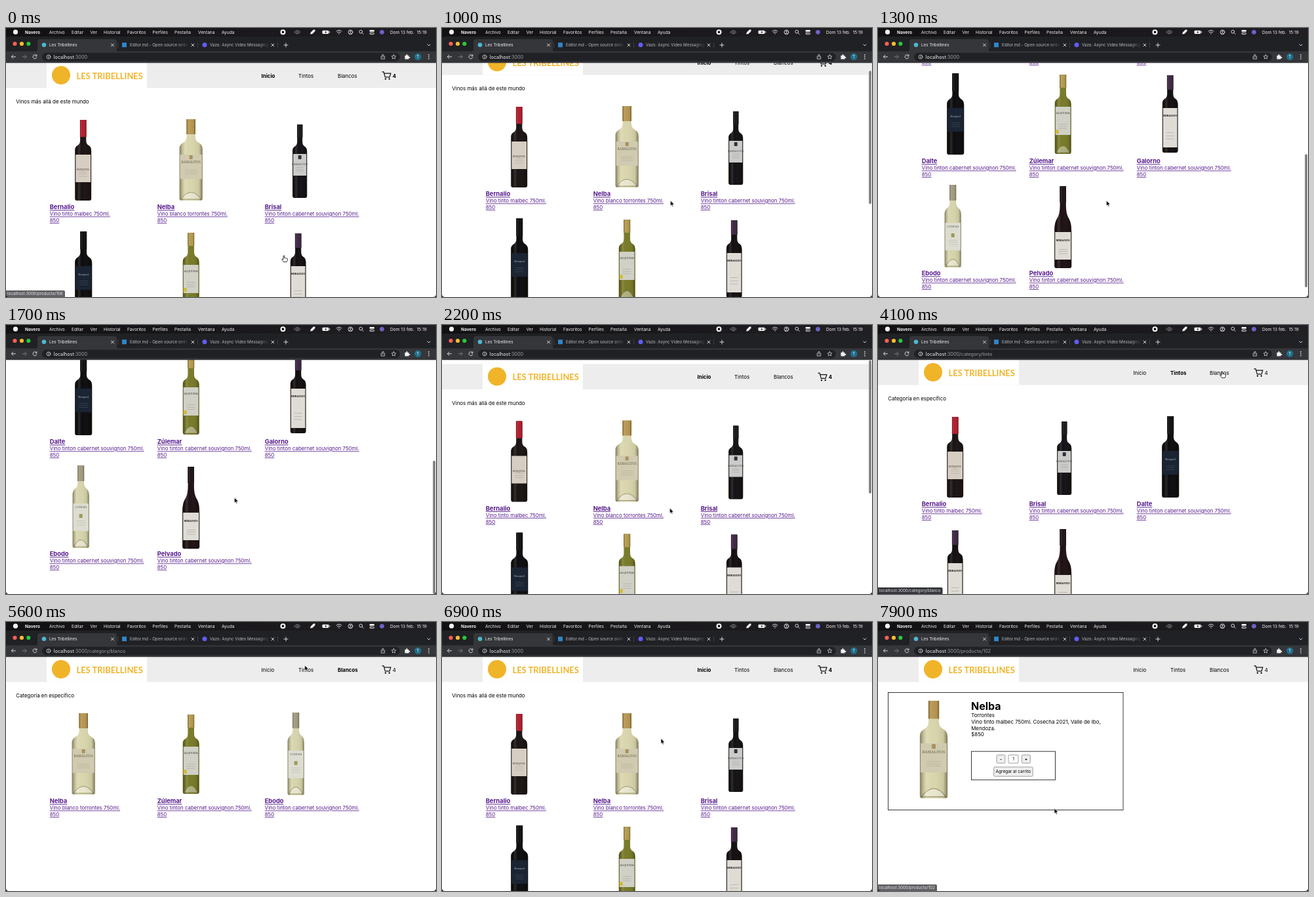
An HTML page that plays this animation: 656 px wide and 410 px high, repeating every 8000 ms.

```html
<!DOCTYPE html>
<html lang="es">
<head>
<meta charset="utf-8">
<title>Les Tribellines</title>
<style>
@property --s { syntax: "<number>"; inherits: true; initial-value: 0; }
html, body { margin: 0; width: 100%; height: 100%; overflow: hidden; background: #fff; }
svg { display: block; width: 656px; height: 410px; font-family: Inter, "Open Sans", sans-serif; }
#stage { animation: scroll 8s step-end infinite; }
#home { transform: translateY(calc(var(--s) * -1px)); }
#thumb { transform: translateY(calc(max(var(--s), 0) * .575px)); }
.page { font-size: 7.9px; }
.b { font-weight: 700; }
.link { fill: #551a8b; text-decoration: underline; }
.menu { font-size: 6.6px; fill: #f2f2f2; }
.tab { font-size: 6.25px; fill: #b9bbbf; }
.url { font-size: 7.25px; fill: #9aa0a6; }
.url tspan { fill: #f1f1f1; }
.icon { fill: none; stroke: #d5d7da; stroke-width: 1; stroke-linecap: round; stroke-linejoin: round; }
.status { font-size: 6.2px; }
.on-home, .on-red, .on-white, .on-item, #bar, #hand, #arrow, .status { animation: 8s step-end infinite; opacity: 0; }
.on-home { animation-name: home; }
.on-red { animation-name: red; }
.on-white { animation-name: white; }
.on-item { animation-name: item; }
#bar { animation-name: bar; }
#hand { animation-name: hand; }
#arrow { animation-name: arrow; }
#cursor { animation: move 8s infinite; }

@keyframes scroll {
  0% { --s: 0 } 12.5% { --s: 20 } 13.75% { --s: 90 } 15% { --s: 180 } 16.25% { --s: 241 }
  17.5% { --s: 252 } 18.75% { --s: 259 } 20% { --s: 263 } 21.25% { --s: 266 } 22.5% { --s: 256 }
  23.75% { --s: 195 } 25% { --s: 95 } 26.25% { --s: 15 } 27.5% { --s: -6.5 } 28.75% { --s: -4 }
  30% { --s: -2 } 31.25%, 100% { --s: 0 }
}
@keyframes home { 0% { opacity: 1 } 42.5% { opacity: 0 } 81.25% { opacity: 1 } 93.75%, 100% { opacity: 0 } }
@keyframes red { 0% { opacity: 0 } 42.5% { opacity: 1 } 53.75%, 100% { opacity: 0 } }
@keyframes white { 0% { opacity: 0 } 53.75% { opacity: 1 } 81.25%, 100% { opacity: 0 } }
@keyframes item { 0% { opacity: 0 } 93.75%, 100% { opacity: 1 } }
@keyframes bar { 0% { opacity: 0 } 12.5% { opacity: 1 } 35% { opacity: .5 } 36.25%, 100% { opacity: 0 } }
@keyframes hand {
  0% { opacity: 1 } 2.5% { opacity: 0 } 40% { opacity: 1 } 47.5% { opacity: 0 } 50% { opacity: 1 }
  58.75% { opacity: 0 } 76.25% { opacity: 1 } 83.75% { opacity: 0 } 90% { opacity: 1 } 98.75%, 100% { opacity: 0 }
}
@keyframes arrow {
  0% { opacity: 0 } 2.5% { opacity: 1 } 40% { opacity: 0 } 47.5% { opacity: 1 } 50% { opacity: 0 }
  58.75% { opacity: 1 } 76.25% { opacity: 0 } 83.75% { opacity: 1 } 90% { opacity: 0 } 98.75%, 100% { opacity: 1 }
}
@keyframes move {
  0% { transform: translate(424px, 347px); animation-timing-function: steps(7) }
  8.75%, 22.5% { transform: translate(348.5px, 263px); animation-timing-function: steps(4) }
  27.5%, 35% { transform: translate(347.5px, 279px); animation-timing-function: steps(4) }
  40%, 46.25% { transform: translate(457px, 71px); animation-timing-function: steps(3) }
  50%, 57.5% { transform: translate(525px, 71px); animation-timing-function: steps(4) }
  62.5% { transform: translate(474px, 140px); animation-timing-function: steps(5) }
  68.75%, 70% { transform: translate(455.7px, 66px); animation-timing-function: steps(5) }
  76.25%, 82.5% { transform: translate(399px, 71px); animation-timing-function: steps(6) }
  90%, 100% { transform: translate(269px, 284px) }
}
@keyframes st-start { 0% { opacity: .78 } 2.5%, 100% { opacity: 0 } }
@keyframes st-red { 0% { opacity: 0 } 41.25% { opacity: 1 } 47.5%, 100% { opacity: 0 } }
@keyframes st-white { 0% { opacity: 0 } 51.25% { opacity: 1 } 60%, 100% { opacity: 0 } }
@keyframes st-home { 0% { opacity: 0 } 77.5% { opacity: 1 } 85%, 100% { opacity: 0 } }
@keyframes st-item { 0% { opacity: 0 } 91.25% { opacity: 1 } 98.75%, 100% { opacity: .78 } }
</style>
</head>
<body>
<svg id="stage" viewBox="0 0 656 410" xmlns="http://www.w3.org/2000/svg">
  <defs>
    <linearGradient id="sheen">
      <stop offset="0" stop-color="#1a1400" stop-opacity=".45"/>
      <stop offset=".13" stop-color="#1a1400" stop-opacity=".12"/>
      <stop offset=".24" stop-color="#fff" stop-opacity=".12"/>
      <stop offset=".4" stop-color="#fff" stop-opacity="0"/>
      <stop offset=".85" stop-color="#1a1400" stop-opacity=".08"/>
      <stop offset="1" stop-color="#1a1400" stop-opacity=".48"/>
    </linearGradient>
    <linearGradient id="fade">
      <stop offset="0" stop-color="#202124" stop-opacity="0"/>
      <stop offset="1" stop-color="#202124"/>
    </linearGradient>
    <linearGradient id="top">
      <stop offset="0" stop-color="#121013"/>
      <stop offset="1" stop-color="#211f23"/>
    </linearGradient>
  </defs>
  <rect width="656" height="410" fill="#fff"/>
  <g id="pages"></g>
  <g id="bar"><rect id="thumb" x="651.3" y="53.8" width="3.6" height="203" rx="1.8" fill="#7d7d7d"/></g>

  <!-- menu bar -->
  <rect width="656" height="20" fill="url(#top)"/>
  <g class="menu" id="menu">
    <circle cx="14.5" cy="6.2" r="3.6"/>
    <text x="29" y="8.6" class="b">Navero</text>
    <text x="586" y="8.6">Dom 13 feb.&#160; 15:19</text>
    <circle cx="422.5" cy="6.2" r="4"/><rect x="420.9" y="4.6" width="3.2" height="3.2" fill="#0c0b0d"/>
    <rect x="482.5" y="3.7" width="10" height="5.2" rx="1.4"/><rect x="493.2" y="5.2" width="1" height="2.2"/>
    <path d="M488.3 4.2l-2 2.6h1.5l-.6 1.8 2.3-2.7h-1.5z" fill="#0c0b0d"/>
    <circle cx="573.5" cy="6.3" r="3.4" fill="#6b63c9"/>
    <path d="M464 9.5l1-3 4-4 2.5 0 0 2.5-4 4z"/>
    <rect x="554.5" y="3" width="7.5" height="2.7" rx="1.3"/>
  </g>
  <g class="icon">
    <path d="M440 6.3q4.5-5.4 9 0q-4.5 5.4-9 0z" stroke="#777"/><circle cx="444.5" cy="6.3" r="1.5" stroke="#777"/>
    <path d="M504 5q4-3.6 8 0M505.5 6.8q2.5-2.2 5 0M507.5 8.8h1"/>
    <circle cx="525.5" cy="6.3" r="3.4"/><circle cx="525.5" cy="5.3" r="1"/><path d="M523.5 8.6q2-2.2 4 0"/>
    <circle cx="541.3" cy="5.6" r="2.4"/><path d="M543.2 7.5l2 2"/>
    <rect x="554.9" y="7.4" width="6.8" height="2.2" rx="1.1"/>
  </g>

  <!-- browser frame -->
  <path d="M0 37V17q0-4 4-4H652q4 0 4 4V37z" fill="#202124"/>
  <path d="M45 36q3 0 3-3V21q0-4 4-4H165q4 0 4 4V33q0 3 3 3z" fill="#35363a"/>
  <rect y="35.5" width="656" height="17.8" fill="#35363a"/>
  <circle cx="13.5" cy="24" r="3.1" fill="#ff5f57"/>
  <circle cx="24" cy="24" r="3.1" fill="#febc2e"/>
  <circle cx="34.3" cy="24" r="3.1" fill="#28c840"/>
  <circle cx="58" cy="25.8" r="3.3" fill="#4cb8d0"/>
  <rect x="177" y="22.3" width="7" height="7" fill="#2f86c9"/>
  <circle cx="303" cy="25.8" r="3.5" fill="#625df5"/>
  <g class="tab">
    <text x="66" y="28" fill="#f1f1f1">Les Tribellines</text>
    <text x="189" y="28">Editor.md - Open source onlin</text>
    <text x="311" y="28">Vazo: Async Video Messaging</text>
  </g>
  <rect x="262" y="20" width="17" height="12" fill="url(#fade)"/>
  <rect x="385" y="20" width="17" height="12" fill="url(#fade)"/>
  <rect x="279" y="20" width="13" height="12" fill="#202124"/>
  <rect x="402" y="20" width="10" height="12" fill="#202124"/>
  <rect x="55" y="37.8" width="546" height="12.6" rx="6.3" fill="#202124"/>
  <g class="icon">
    <path d="M160.5 24l4 4m0-4l-4 4M283 24l4 4m0-4l-4 4M405 24l4 4m0-4l-4 4M427 23v6m-3-3h6M643 25l2 2 2-2"/>
    <path d="M170.8 22v8M292.5 22v8M414.5 22v8" stroke="#55575b" stroke-width=".6"/>
    <path d="M14.5 43.8h-6m2.5-2.7l-2.7 2.7 2.7 2.7"/>
    <path d="M25 43.8h6m-2.5-2.7l2.7 2.7-2.7 2.7" stroke="#77797d"/>
    <path d="M46.5 42a3 3 0 1 0 .4 2.8M46.9 40.8v2h-2"/>
    <circle cx="65" cy="44" r="3" stroke-width=".8"/><path d="M65 43.8v1.6M65 42.5v.1"/>
    <path d="M573.5 43h-1.2v4.2h5.4v-4.2h-1.2M575 45v-4.6m-1.4 1.4l1.4-1.5 1.4 1.5" stroke-width=".8"/>
    <path d="M591.5 40.5l1 2.2 2.4.3-1.8 1.6.5 2.4-2.1-1.2-2.1 1.2.5-2.4-1.8-1.6 2.4-.3z" stroke-width=".8"/>
  </g>
  <path d="M608.5 42h2q-.4-2 1-2t1 2h2v2q2-.4 2 1t-2 1v1.6h-6z" fill="#f1f1f1"/>
  <circle cx="628.3" cy="43.8" r="5.2" fill="#1f6f8b"/>
  <text x="628.3" y="46" font-size="6" fill="#fff" text-anchor="middle">T</text>
  <g fill="#d5d7da"><circle cx="645" cy="41" r=".9"/><circle cx="645" cy="43.9" r=".9"/><circle cx="645" cy="46.8" r=".9"/></g>
  <g class="url" id="urls"></g>
  <g id="statuses"></g>
  <path d="M0 405.5V410H4.5Q0 410 0 405.5zM656 405.5V410H651.5Q656 410 656 405.5z" fill="#111"/>

  <g id="cursor">
    <path id="arrow" d="M0 0V8.1L1.8 6.5 3 9.2 4.4 8.6 3.2 6 5.7 5.8z" fill="#000" stroke="#fff" stroke-width=".6"/>
    <path id="hand" d="M-1 1q0-1.200.9-1.200T.8 1V3.700q1-.9 1.700.1 1-.7 1.600.4 1.300-.4 1.300.9 0 2.700-1.200 4.500H-.3Q-1.500 7.600-2.900 6.300q-.6-1.200.5-1.200L-1 6z" fill="#fff" stroke="#000" stroke-width=".8"/>
  </g>
</svg>
<script>
const put = (id, html) => document.getElementById(id).insertAdjacentHTML('beforeend', html);
const text = (x, y, s, attrs = '') => `<text x="${x}" y="${y}" ${attrs}>${s}</text>`;
const box = (x, y, w, h, attrs) => `<rect x="${x}" y="${y}" width="${w}" height="${h}" ${attrs}/>`;

// n, b: half widths of neck and body; top, foot: ends; neck, arm: where the shoulder starts and stops
const cabernet = 'Vino tinton cabernet souvignon 750ml.';
const wines = {
  a: { name: 'Bernalio', info: 'Vino tinto malbec 750ml.', dx: 51, n: 4.6, b: 12.4, top: 1, foot: 124, neck: 32, arm: 48,
       cap: 27, capFill: '#b3182b', glass: '#1a1314', label: [54, 42, '#d6cec2'], brand: ['BOSQUEL', 78, '#4a3a32'] },
  b: { name: 'Nelba', info: 'Vino blanco torrontes 750ml.', dx: 51.5, n: 6.6, b: 17.6, top: 0, foot: 124, neck: 26, arm: 46, pale: true,
       cap: 23, capFill: '#b8954e', glass: '#d9d6ad', label: [54, 37, '#cfcab0'], brand: ['RAMALITOS', 67, '#6b6448'], seal: [55, '#a8935a'] },
  c: { name: 'Brisal', info: cabernet, dx: 53.5, n: 4, b: 11, top: 8, foot: 120, neck: 34, arm: 49,
       cap: 28, capFill: '#17151a', glass: '#131115', label: [53, 33, '#cbcbc9'], brand: ['RAMALITOS', 70, '#555'], seal: [55, '#33343a'] },
  d: { name: 'Dalte', info: cabernet, dx: 51.5, n: 4.8, b: 13, top: 0, foot: 124, neck: 31, arm: 48,
       cap: 27, capFill: '#0c0c0f', glass: '#0c0c0f', label: [53, 36, '#1a2433'], brand: ['Bosquel', 67, '#a9b8c9'] },
  e: { name: 'Zúlemar', info: cabernet, dx: 51.5, n: 4.8, b: 12.4, top: 2, foot: 123, neck: 31, arm: 47, pale: true,
       cap: 22, capFill: '#b39a4c', glass: '#777a28', label: [51, 43, '#d0d0c6'], brand: ['ALQUERIA', 62, '#444'], seal: [86, '#cfbb3a', -9] },
  f: { name: 'Galorno', info: cabernet, dx: 51, n: 4.6, b: 11.8, top: 3, foot: 121, neck: 31, arm: 47,
       cap: 25, capFill: '#3a2442', glass: '#130e10', label: [53, 60, '#dfdbd5'], brand: ['MIRANZO', 66, '#111', 1] },
  g: { name: 'Ebodo', info: cabernet, dx: 47.5, n: 4.8, b: 12.6, top: -1, foot: 125, neck: 24, arm: 45, pale: true,
       cap: 23, capFill: '#a09a80', glass: '#d6d4ac', label: [57, 42, '#dddcd0'], brand: ['LUMERA', 64, '#666'], seal: [73, '#9a9a5a'] },
  h: { name: 'Pelvado', info: cabernet, dx: 51.5, n: 4.6, b: 13, top: 1, foot: 126, neck: 28, arm: 72,
       cap: 26, capFill: '#1a1013', glass: '#1d1114', label: [71, 42, '#dfdbd5'], brand: ['MIRANZO', 85, '#111', 1] }
};

function bottle(w) {
  const { n, b, top, foot, neck, arm } = w, bend = (arm - neck) * .35;
  const d = `M${-n} ${top}H${n}V${neck}C${n} ${arm - bend} ${b} ${neck + bend} ${b} ${arm}V${foot - 3}Q${b} ${foot} ${b - 3} ${foot}` +
    `H${3 - b}Q${-b} ${foot} ${-b} ${foot - 3}V${arm}C${-b} ${neck + bend} ${-n} ${arm - bend} ${-n} ${neck}z`;
  const [ly, lh, lc] = w.label, [word, wy, wc, bold] = w.brand, half = b - 1;
  const cap = box(-n - .2, top, 2 * n + .4, w.cap - top, `rx=".6" fill="`);
  let s = `<path d="${d}" fill="${w.glass}"/>` + cap.replace('fill="', `fill="${w.capFill}"`) + cap.replace('fill="', 'fill="url(#sheen)"');
  // glass base
  if (w.pale) s += `<path d="M${2 - b} ${foot - 2}Q0 ${foot - 23} ${b - 2} ${foot - 2}z" fill="#fff" fill-opacity=".4" stroke="#6d6636" stroke-opacity=".6"/>`;
  s += `<path d="${d}" fill="url(#sheen)"/>` + box(-half, ly, 2 * half, lh, `fill="${lc}"`);
  if (w.seal) s += box((w.seal[2] || 0) - 2.5, w.seal[0], 5, 6, `rx="1" fill="${w.seal[1]}"`);
  for (const k of [.62, .7, .78]) s += box(-half * .55, ly + lh * k, half * 1.1, .5, `fill="${wc}" opacity=".35"`);
  return s + text(0, wy, word, `font-family="Noto Serif, serif" font-size="${b > 15 ? 5 : 4.2}" text-anchor="middle" fill="${wc}" ${bold ? 'class="b"' : ''}`);
}

function header(active) {
  const nav = [['Inicio', 389.5], ['Tintos', 446], ['Blancos', 506]];
  return box(0, 53, 656, 38.5, 'fill="#ededed"') + box(62, 53, 153, 38.5, 'fill="#fff"') +
    '<circle cx="84" cy="72" r="14" fill="#f0b429"/>' +
    text(107.5, 77.5, 'LES TRIBELLINES', 'class="b" font-family="Lato, sans-serif" font-size="12.9" fill="#f0b429"') +
    nav.map(([s, x], i) => text(x, 75.8, s, i === active ? 'class="b"' : '')).join('') +
    '<path d="M573.5 66.8h2.7l2.2 8h6.8l1.7-5.7h-9.8" fill="none" stroke="#111" stroke-width="1.2"/>' +
    '<circle cx="579" cy="77.6" r="1.2"/><circle cx="584.8" cy="77.6" r="1.2"/>' +
    text(589.8, 75.8, '4', active ? '' : 'class="b"');
}

function list(keys, active, title) {
  const cells = [...keys].map((k, i) => {
    const w = wines[k], x = 66.7 + i % 3 * 164, y = 139 + Math.floor(i / 3) * 171;
    return `<g transform="translate(${x + w.dx} ${y})">${bottle(w)}</g>` +
      text(x, y + 137.4, w.name, 'class="link b" font-size="9.3"') +
      text(x, y + 147.4, w.info, 'class="link"') + text(x, y + 157.2, '850', 'class="link"');
  });
  return header(active) + text(15.3, 115, title) + cells.join('');
}

function product() {
  const line = 'fill="none" stroke="#222" stroke-width=".9"';
  const btn = 'rx="1.5" fill="#efefef" stroke="#767676" stroke-width=".7"';
  const mid = 'text-anchor="middle" font-size="6.5"';
  return header(-1) + box(15.5, 107.5, 358.5, 179, line) +
    `<g transform="translate(85 120) scale(1.2)">${bottle(wines.b)}</g>` +
    text(142, 134, wines.b.name, 'class="b" font-size="16"') +
    ['Torrontes', 'Vino tinto malbec 750ml. Cosecha 2021, Valle de Ibo,', 'Mendoza.', '$850']
      .map((s, i) => text(142.2, 145.3 + i * 9.7, s)).join('') +
    box(142.5, 197.2, 128, 43.5, line) +
    box(181, 202.7, 12.8, 12.4, btn) + text(187.4, 211.3, '-', mid + ' class="b"') +
    box(199, 202.7, 15, 12.4, 'rx="1" fill="#fff" stroke="#767676" stroke-width=".7"') + text(206.5, 211.3, '1', mid) +
    box(219.5, 202.7, 12.8, 12.4, btn) + text(225.9, 211.3, '+', mid + ' class="b"') +
    box(176.7, 221, 59.5, 14.2, btn) + text(206.4, 230.4, 'Agregar al carrito', mid);
}

const page = (cls, body) => `<g class="page ${cls}">${body}</g>`;
put('pages', page('on-home', `<g id="home">${list('abcdefgh', 0, 'Vinos más allá de este mundo')}</g>`) +
  page('on-red', list('acdfh', 1, 'Categoría en específico')) +
  page('on-white', list('beg', 2, 'Categoría en específico')) +
  page('on-item', product()));

const menus = { Archivo: 66, Editar: 100, Ver: 128.5, Historial: 149, Favoritos: 185, Perfiles: 223.5, Pestaña: 257, Ventana: 293, Ayuda: 329 };
for (const s in menus) put('menu', text(menus[s], 8.6, s));

const urls = { home: '', red: '/category/tinto', white: '/category/blanco', item: '/producto/102' };
for (const k in urls) put('urls', text(72.8, 46.5, `<tspan>localhost</tspan>:3000${urls[k]}`, `class="on-${k}"`));

const hints = { start: ['/producto/106', 90], red: ['/category/tinto', 92], white: ['/category/blanco', 98.5], home: ['', 49], item: ['/producto/102', 90] };
for (const k in hints) {
  const [path, w] = hints[k];
  put('statuses', `<g class="status" style="animation-name:st-${k}">` +
    `<path d="M0 400H${w - 2}q2 0 2 2V410H0z" fill="#34353a"/>` +
    text(2, 407.2, 'localhost:3000' + path, 'fill="#dcdde0"') + '</g>');
}
</script>
</body>
</html>
```
